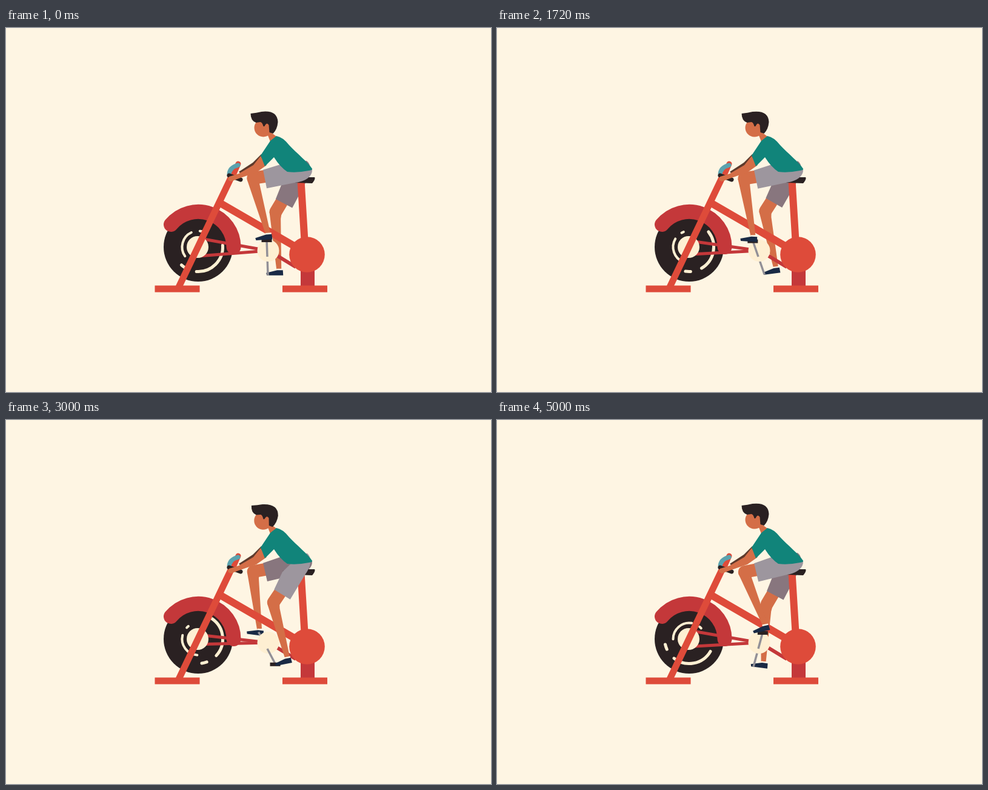
Animation of 800x600 px, one loop 5.04 s. Source, as an HTML page:

```html
<!DOCTYPE html>
<html>
<head>
<meta charset="utf-8">
<style>
  html, body { margin: 0; height: 100%; overflow: hidden; background: #fef5e3; }
  svg { display: block; width: 100vw; height: 100vh; }
  .line { fill: none; stroke-linecap: round; }
  .red { fill: #de4b3a; }
  .dark { fill: #c4383a; }
  .cream { fill: #feefd2; }
  .skin { fill: #d46e47; }
  .black { fill: #2a2122; }
  .bar { stroke: #de4b3a; stroke-width: 12; }
  .rod { stroke: #c4383a; stroke-width: 5; }
  .crank { stroke: #929097; stroke-width: 3.5; }
</style>
</head>
<body>
<svg viewBox="0 0 800 600">
  <defs>
    <path id="thighShape" class="line" d="M30 0H78" stroke="#d46e47" stroke-width="21"/>
    <path id="shorts" d="M60 -11L58.5 20L10 17.5C-8 18 -20 10 -20 0L0 -10L28 -16Z"/>
    <path id="calfShape" class="skin" d="M0 -10L12 -7.5L95 -4V4L0 10.5A10.5 10.5 0 0 1 0 -10Z"/>
    <g id="shoe">
      <path d="M3 -7H13V-3H3Z" fill="#fff6e8"/>
      <path d="M-14 0L4 -4.5H13.5L14 4H-13Z" fill="#192a45"/>
    </g>
  </defs>

  <g id="farLeg"></g>
  <line id="farCrank" class="crank"/>

  <circle class="black" cx="317" cy="361" r="57"/>
  <g id="wheel" class="line" stroke="#feefd2"></g>
  <line class="rod" id="rodA" x2="432" y2="367"/>
  <line class="rod" id="rodB" x2="432" y2="367"/>
  <path class="line" d="M272 324A58.5 58.5 0 0 1 375.5 361" stroke="#c4383a" stroke-width="24"/>
  <circle class="cream" cx="316" cy="361" r="18"/>

  <path d="M432 366L478 394" stroke="#c4383a" stroke-width="6"/>
  <path class="dark" d="M486 390H509V425H486Z"/>
  <path class="bar" d="M354 289L480 362M486.500 252L492.500 350"/>
  <path d="M371 247L285 427" stroke="#de4b3a" stroke-width="11"/>
  <circle class="red" cx="496.500" cy="373.500" r="29.300"/>
  <path class="red" d="M245.500 424.500H319.500V435.500H245.500ZM456 424.500H530V435.500H456Z"/>
  <path class="black" d="M456 249L480 246H509Q511 249 505 256L478 255Z"/>
  <circle class="cream" cx="432.500" cy="367" r="18"/>

  <line id="nearCrank" class="crank"/>
  <rect id="pedal" class="black" width="17" height="6"/>
  <g id="nearLeg"></g>

  <path d="M421 208L407 222L384 237L388 241L409 230L425 212Z" fill="#5d3a2c"/>
  <path class="line" d="M383 224L376 240" stroke="#de4b3a" stroke-width="9"/>
  <path class="line" d="M368 242Q368 230 383 226" stroke="#5ba2ae" stroke-width="7"/>
  <path class="line" d="M368 243L387 250" stroke="#2a2122" stroke-width="7"/>
  <path class="skin" d="M420 211L430 226L413 238L384 248L371 253Q363 250 368 245L384 240L408 226Z"/>
  <path class="skin" d="M430 172H437L449 181L437 190Z"/>
  <path d="M446 178Q457 180 467 193C480 207 498 221 505 232Q506 234 500 235Q480 239 464 237Q452 229 442 213L427 228L420 210L436 186Z" fill="#11847a"/>
  <g id="head">
    <circle class="skin" cx="425" cy="164.500" r="15"/>
    <path class="black" d="M404 141Q414 140 422 138Q448 135 449 155Q448 167 441 174L435 172L434 160Q431 155 428 160Q427 163 425 162Q423 155 420 155L413 156Q404 153 404 141Z"/>
  </g>
</svg>
<script>
const TURN = 840, STEP = 40;
const HIP = [485, 236], AXLE = [431, 377], THIGH = 78, CALF = 95;
const $ = id => document.getElementById(id);
const deg = a => a * 180 / Math.PI;
const set = (el, attrs) => { for (const k in attrs) el.setAttribute(k, attrs[k]); };
const place = (el, x, y, angle, extra = '') =>
  el.setAttribute('transform', `translate(${x} ${y}) rotate(${angle}) ${extra}`);

function arc(r, from, to, width) {
  const at = a => [317 + r * Math.cos(a * Math.PI / 180), 361 + r * Math.sin(a * Math.PI / 180)];
  return `<path d="M${at(from)}A${r} ${r} 0 0 1 ${at(to)}" stroke-width="${width}"/>`;
}
$('wheel').innerHTML = arc(40.5, 0, 98, 5) + arc(40.5, 125, 137, 5) +
  arc(26.5, 149, 249, 4) + arc(26.5, 280, 288, 4);

function makeLeg(id, cloth) {
  const leg = $(id);
  leg.innerHTML = `<use href="#thighShape"/><use href="#calfShape"/>
    <use href="#shorts" fill="${cloth}"/><use href="#shoe"/>`;
  return leg.children;
}
const near = makeLeg('nearLeg', '#9d969e'), far = makeLeg('farLeg', '#88767e');

// phase 0 has the pedal at the top, moving towards the front wheel
function poseLeg([thigh, calf, shorts, shoe], phase) {
  const c = Math.cos(phase), s = Math.sin(phase);
  const fx = 434.2 - 7.8 * c - 35 * s, fy = 374.5 - 29.5 * c + 4 * s;
  const tilt = -(2 + 3 * c - 26 * s);
  const ax = fx + 7, ay = fy - 6;
  const dx = ax - HIP[0], dy = ay - HIP[1];
  const reach = Math.min(Math.hypot(dx, dy), THIGH + CALF);
  const bend = Math.acos((THIGH ** 2 + reach ** 2 - CALF ** 2) / (2 * THIGH * reach));
  const a = Math.atan2(dy, dx) + bend;
  const kx = HIP[0] + THIGH * Math.cos(a), ky = HIP[1] + THIGH * Math.sin(a);
  place(thigh, ...HIP, deg(a), 'scale(1 -1)');
  place(shorts, ...HIP, deg(a), 'scale(1 -1)');
  place(calf, kx, ky, deg(Math.atan2(ay - ky, ax - kx)));
  place(shoe, fx, fy, tilt);
}

function poseCrank(line, phase, length) {
  const x = AXLE[0] - length * Math.sin(phase), y = AXLE[1] - length * Math.cos(phase);
  set(line, { x1: AXLE[0], y1: AXLE[1], x2: x, y2: y });
  return [x, y];
}

function draw(now) {
  const t = Math.floor(now / STEP) * STEP % TURN;
  const phase = 2 * Math.PI * t / TURN + 0.035, spin = 2 * phase;

  poseLeg(near, phase);
  poseLeg(far, phase + Math.PI);
  const [px, py] = poseCrank($('nearCrank'), phase, 28);
  poseCrank($('farCrank'), phase + Math.PI, 31);
  set($('pedal'), { x: px - 8.5, y: py - 2 });

  set($('wheel'), { transform: `rotate(${-deg(spin)} 317 361)` });
  const rx = 15 * Math.sin(spin), ry = 15 * Math.cos(spin);
  set($('rodA'), { x1: 316 - rx, y1: 361 - ry });
  set($('rodB'), { x1: 316 + rx, y1: 361 + ry });

  const nod = (1 - Math.cos(phase)) / 2;
  set($('head'), { transform: `translate(${-0.5 - nod} ${1.8 * nod}) rotate(${4 * nod} 432 175)` });
  requestAnimationFrame(draw);
}
draw(0);
</script>
</body>
</html>
```
